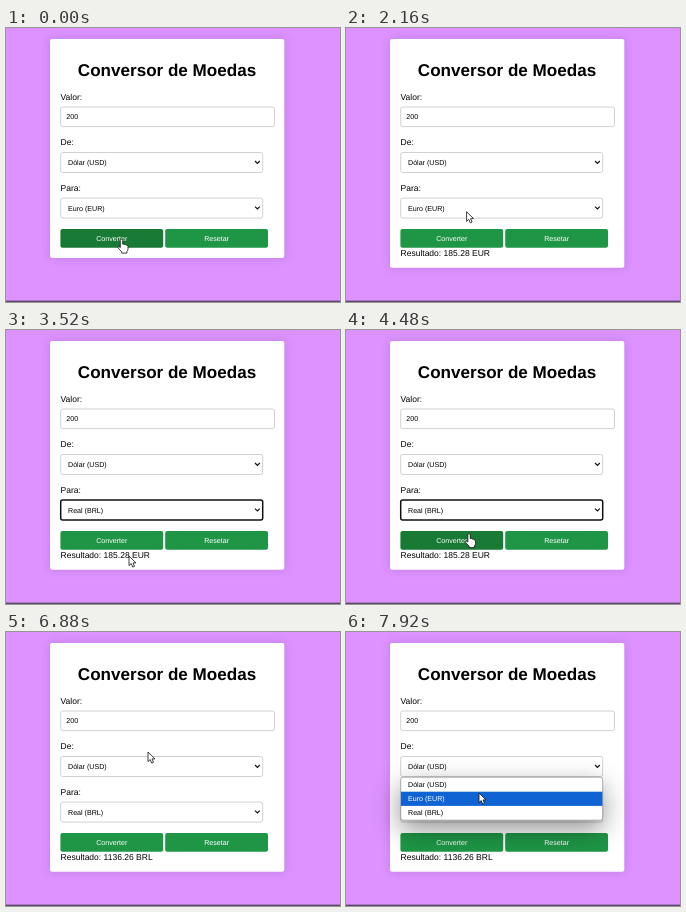
Recreate the animation shown at these times as an HTML page. Size 334 px wide and 274 px high, loop 8 s.

```html
<!DOCTYPE html>
<html lang="pt-BR">
<head>
<meta charset="utf-8">
<title>Conversor de Moedas</title>
<style>
html, body { margin: 0; width: 100%; height: 100%; overflow: hidden; background: #dd92ff; }
svg { display: block; width: 334px; height: 274px; font: 7.11px "Liberation Sans", Arial, sans-serif; text-rendering: geometricPrecision; }
.card { fill: #fff; filter: drop-shadow(0 0 5px rgba(0,0,0,.13)); }
.title { font-size: 17.07px; font-weight: bold; text-anchor: middle; }
.label { font-size: 8.53px; }
.field { fill: #fff; stroke: #c6c6c6; stroke-width: .8; }
.focus { stroke: #111; stroke-width: 1.5; }
.chevron { fill: none; stroke: #111; stroke-width: 1.2; }
.button text { fill: #fff; text-anchor: middle; }
.button rect { fill: #1e9646; }
.button.hover rect { fill: #197a36; }
#popup { filter: drop-shadow(0 9px 13px rgba(0,0,0,.42)); }
#popup .frame { fill: #fff; stroke: #8c8c8c; stroke-width: .7; }
#mark { fill: #0f63d2; }
.cursor { fill: #fff; stroke: #111; stroke-width: .8; stroke-linejoin: round; }
</style>
</head>
<body>
<svg viewBox="0 0 334 274">
  <rect y="272.6" width="334" height="1.4" fill="#5d4a6b"/>
  <rect id="card" class="card" x="44" y="11" width="234.3" height="219" rx="2.2"/>
  <text class="title" x="161" y="48">Conversor de Moedas</text>
  <text class="label" x="54.5" y="72">Valor:</text>
  <rect class="field" x="54.7" y="79" width="213.8" height="19.6" rx="2"/>
  <text x="60.3" y="91.3">200</text>
  <text class="label" x="54.5" y="117.3">De:</text>
  <rect class="field" x="54.7" y="124.5" width="202" height="20" rx="2"/>
  <text x="62" y="137.1">Dólar (USD)</text>
  <path class="chevron" d="M249 133l2.4 2.4 2.4-2.4"/>
  <text class="label" x="54.5" y="162.8">Para:</text>
  <rect id="toBox" class="field" x="54.7" y="170.1" width="202" height="20" rx="2"/>
  <text id="to" x="62" y="182.6"></text>
  <path class="chevron" d="M249 178.6l2.4 2.4 2.4-2.4"/>
  <g id="convert" class="button">
    <rect x="54.4" y="201" width="102.8" height="18.8" rx="2"/>
    <text x="105.8" y="213">Converter</text>
  </g>
  <g class="button">
    <rect x="159.2" y="201" width="102.8" height="18.8" rx="2"/>
    <text x="210.6" y="213">Resetar</text>
  </g>
  <text id="result" class="label" x="54.5" y="227.6"></text>
  <g id="popup">
    <rect class="frame" x="54.7" y="0" width="202" height="43" rx="2.5"/>
    <rect id="mark" x="55" width="201.4" height="14.2"/>
    <text x="62" y="9.8">Dólar (USD)</text>
    <text x="62" y="24">Euro (EUR)</text>
    <text x="62" y="38.2">Real (BRL)</text>
  </g>
  <path id="arrow" class="cursor" d="M0 0v9.6l2.2-2 1.5 3.5 1.8-.8-1.5-3.4h3z"/>
  <g id="hand" class="cursor">
    <path d="M-1.2 1Q-1-.4 0-.4T1.2 1V4.6Q2.8 3.8 3.4 5 4.8 4.4 5.3 5.6 6.8 5.4 6.8 7V9.4Q6.8 11 5.6 12.2V13.6H.2V12.4L-3.2 8.4Q-4-.2-3.6 7 -2.6 6.2-1.2 7.8z" style="display:none"/>
    <path d="M-1.2 1Q-1-.4 0-.4T1.2 1V4.7Q2.8 3.9 3.3 5.1 4.7 4.6 5.1 5.8 6.5 5.6 6.5 7.1V9.4Q6.4 11 5.4 12V13.6H.2V12.3L-3.3 8.6Q-4 7.4-3 6.8L-1.2 8z"/>
  </g>
</svg>
<script>
const LOOP = 8000;
const $ = id => document.getElementById(id);
const show = (el, on) => el.style.display = on ? "" : "none";

// Pointer path: time, x, y
const path = [
  [0, 115.5, 211.5], [700, 115.5, 211.5], [1200, 117, 208], [1840, 117, 208],
  [2240, 121, 181], [2480, 121, 181], [2880, 123, 219], [3120, 123, 226],
  [3600, 123, 226], [4200, 123, 204], [6260, 123, 204], [6800, 142, 120],
  [7160, 142, 120], [7400, 136, 135], [7560, 136, 135], [7840, 133, 161], [LOOP, 133, 161]
];

function pointer(t) {
  const i = path.findIndex(p => p[0] > t);
  const [t0, x0, y0] = path[i - 1], [t1, x1, y1] = path[i];
  const u = (t - t0) / (t1 - t0), e = u * u * (3 - 2 * u);
  return [x0 + (x1 - x0) * e, y0 + (y1 - y0) * e];
}

function draw(t) {
  const [x, y] = pointer(t);
  const toOpen = t >= 2400 && t < 3440, fromOpen = t >= 7480;
  const open = toOpen || fromOpen;
  const top = fromOpen ? 145.2 : 190.9;

  $("card").setAttribute("height", t < 480 ? 219 : 228.8);
  $("result").textContent = t < 480 ? "" : "Resultado: " + (t < 4960 ? "185.28 EUR" : "1136.26 BRL");
  $("to").textContent = t < 3440 ? "Euro (EUR)" : "Real (BRL)";
  $("toBox").classList.toggle("focus", t >= 3440 && t < 4960);

  show($("popup"), open);
  if (open) {
    const chosen = fromOpen ? 0 : 1;
    const over = Math.floor((y - top - .5) / 14.2);
    const row = over < 0 ? chosen : Math.min(over, 2);
    $("popup").setAttribute("transform", `translate(0 ${top})`);
    $("mark").setAttribute("y", .3 + row * 14.2);
    $("popup").querySelectorAll("text").forEach((el, i) => el.setAttribute("fill", i === row ? "#fff" : "#000"));
  }

  const hover = !open && y > 201 && y < 220;
  $("convert").classList.toggle("hover", hover);
  show($("hand"), hover);
  show($("arrow"), !hover);
  $(hover ? "hand" : "arrow").setAttribute("transform", `translate(${x} ${y})`);
}

function tick() {
  draw(performance.now() % LOOP);
  requestAnimationFrame(tick);
}
tick();
</script>
</body>
</html>
```
